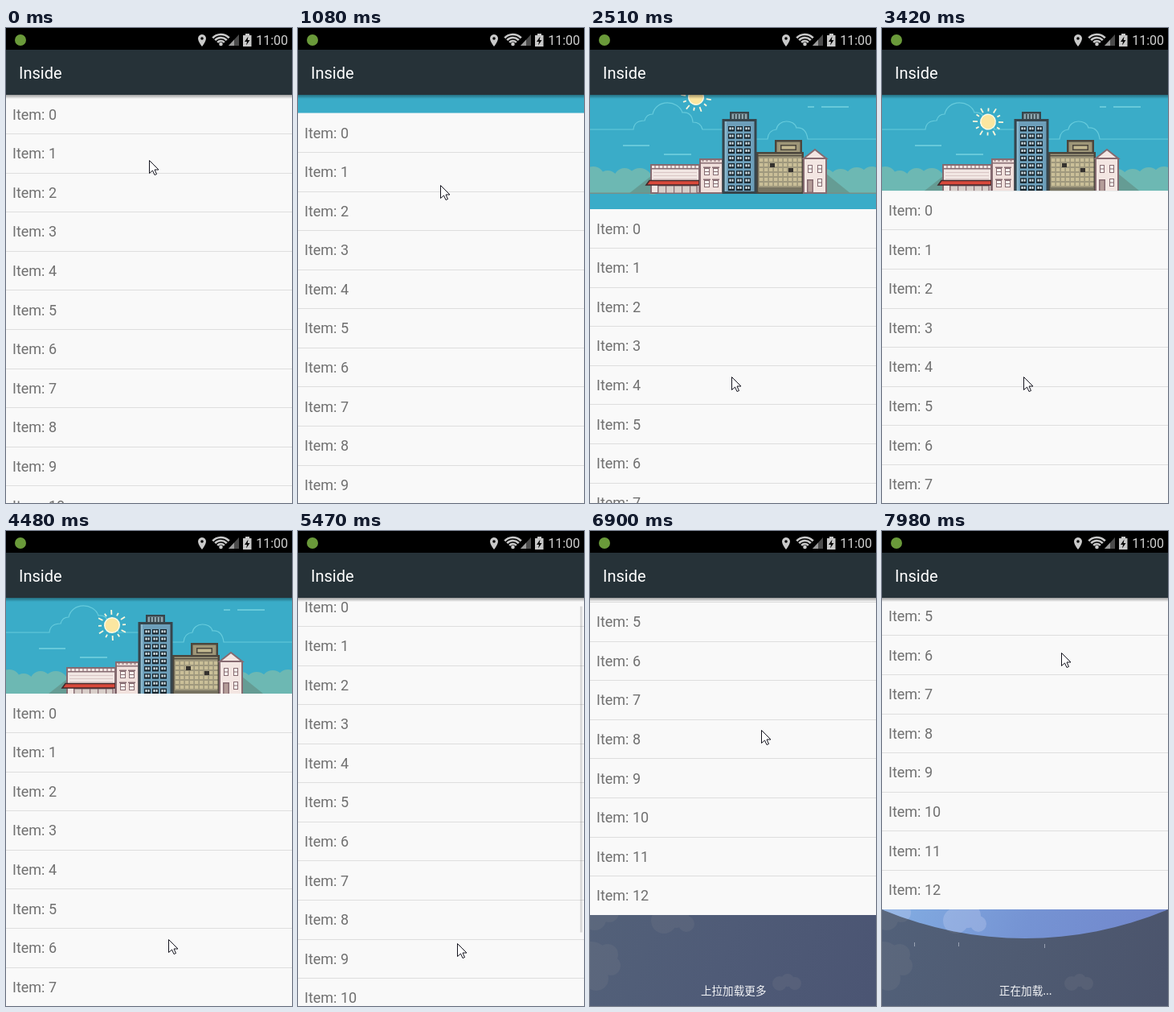
These frames come from a looping animation (356 by 590 pixels, 8 s). An HTML page with a canvas:

```html
<!DOCTYPE html>
<html lang="en">
<head>
<meta charset="utf-8">
<title>Pull to refresh list</title>
<style>
html, body { margin: 0; width: 100%; height: 100%; overflow: hidden; background: #000; }
canvas { display: block; width: 356px; height: 590px; }
</style>
</head>
<body>
<canvas id="stage"></canvas>
<script>
const W = 356, H = 590, TOP = 83, ROW = 48.58, ROWS = 13, HOLD = 119, LOOP = 8000;
const TAU = Math.PI * 2;
const canvas = document.getElementById('stage');
const c = canvas.getContext('2d');
const dpr = window.devicePixelRatio || 1;
canvas.width = W * dpr;
canvas.height = H * dpr;

// Keys are [time, value, ...]; linear in between.
const pointer = [
  [0, 178, 164], [90, 178, 164], [440, 178, 146], [820, 178, 146], [1000, 177, 175],
  [1620, 176, 324], [2100, 176, 402], [2510, 176, 433], [3510, 176, 433],
  [4390, 202, 507], [4480, 202, 507], [5290, 198, 524], [5380, 198, 524],
  [6270, 196, 406], [6900, 213, 247], [7080, 217, 220], [7400, 221, 180], [7710, 223, 151]
];
const scroll = [
  [5380, 0], [6270, 134.5], [6900, 237.5], [7080, 250], [7400, 272],
  [7710, 286], [7800, 286], [7890, 265], [7970, 244.5]
];

function track(keys, t) {
  if (t <= keys[0][0]) return keys[0].slice(1);
  for (let i = 1; i < keys.length; i++) {
    const a = keys[i - 1], b = keys[i];
    if (t < b[0]) {
      const p = (t - a[0]) / (b[0] - a[0]);
      return a.slice(1).map((v, j) => v + (b[j + 1] - v) * p);
    }
  }
  return keys[keys.length - 1].slice(1);
}
const clamp = v => Math.max(0, Math.min(1, v));

// Distance the list is pulled below the toolbar.
function pullAt(t) {
  if (t < 2740) return t < 820 ? 0 : Math.max(0, (track(pointer, t)[1] - 149) / 2);
  if (t < 4490) return HOLD + 23 * (1 - clamp((t - 2740) / 760)) ** 2;
  return HOLD * (1 - clamp((t - 4490) / 700)) ** 3;
}

function rect(x, y, w, h, fill) {
  c.fillStyle = fill;
  c.fillRect(x, y, w, h);
}
function box(x, y, w, h, fill, line, lw = 2) {
  rect(x, y, w, h, line);
  rect(x + lw, y + lw, w - 2 * lw, h - 2 * lw, fill);
}
function poly(pts, fill, line, lw = 1) {
  c.beginPath();
  pts.forEach(([x, y]) => c.lineTo(x, y));
  c.closePath();
  if (fill) { c.fillStyle = fill; c.fill(); }
  if (line) { c.strokeStyle = line; c.lineWidth = lw; c.stroke(); }
}
function dot(x, y, r, fill) {
  c.beginPath();
  c.arc(x, y, r, 0, TAU);
  c.fillStyle = fill;
  c.fill();
}
function text(s, x, y, size, fill, align = 'left', font = 'Roboto, sans-serif') {
  c.font = size + 'px ' + font;
  c.textAlign = align;
  c.fillStyle = fill;
  c.fillText(s, x, y);
}
function clipped(path, draw) {
  c.save();
  c.beginPath();
  path();
  c.clip();
  draw();
  c.restore();
}
function shifted(dy, draw) {
  c.save();
  c.translate(0, dy);
  draw();
  c.restore();
}

function sky() {
  c.strokeStyle = '#66cbdc';
  c.lineWidth = 1.2;
  c.beginPath();
  c.moveTo(0, 126);
  c.lineTo(54, 126);
  c.quadraticCurveTo(55, 115, 68, 115);
  c.quadraticCurveTo(70, 107, 78, 107);
  c.bezierCurveTo(82, 88, 110, 89, 115, 105);
  c.quadraticCurveTo(127, 104, 128, 117);
  c.quadraticCurveTo(138, 117, 140, 126);
  c.lineTo(166, 126);
  c.moveTo(200, 138);
  c.lineTo(221, 138);
  c.quadraticCurveTo(222, 127, 232, 126);
  c.bezierCurveTo(234, 113, 254, 113, 257, 124);
  c.quadraticCurveTo(269, 123, 271, 138);
  c.lineTo(356, 138);
  c.stroke();
  [[271, 98, 8], [288, 98, 34], [41, 146, 33], [92, 157, 34]]
    .forEach(([x, y, w]) => rect(x, y - .8, w, 1.6, '#73d0df'));
}

function sun(y, turn) {
  c.save();
  c.translate(132, y);
  c.rotate(turn);
  c.strokeStyle = '#fff7dc';
  c.lineWidth = 1.8;
  for (let i = 0; i < 12; i++) {
    c.rotate(TAU / 12);
    c.beginPath();
    c.moveTo(0, 13);
    c.lineTo(0, i % 2 ? 17 : 19);
    c.stroke();
  }
  dot(0, 0, 10, '#fffbe8');
  dot(0, 0, 8.6, '#fbe6a0');
  c.restore();
}

function sash(x, y, w, h, frame) {
  box(x, y, w, h, '#f8f4f0', frame, 1);
  rect(x, y + h / 2 - .5, w, 1, frame);
}

function town() {
  const plum = '#866b71', ink = '#36454c', brown = '#4b463d';
  // hills
  c.fillStyle = '#6db8b3';
  c.beginPath();
  [[4, 186, 14], [22, 190, 13], [43, 187, 13], [62, 190, 16], [78, 194, 13],
   [292, 190, 15], [312, 189, 14], [332, 187, 14], [351, 186, 14]].forEach(([x, y, r]) => {
    c.moveTo(x + r, y);
    c.arc(x, y, r, 0, TAU);
  });
  c.rect(0, 189, W, 16);
  c.fill();
  poly([[48, 206], [76, 184], [76, 206]], '#659c94');
  poly([[294, 181], [325, 206], [294, 206]], '#659c94');
  rect(0, 204.5, W, 1.5, '#74908a');

  // shop
  box(75, 169, 62, 37, '#f2e7e4', plum);
  rect(77, 174, 58, 1.5, plum);
  for (let x = 80; x < 134; x += 5) rect(x, 171, 2, 3, '#b7a0a2');
  for (let y = 179; y < 188; y += 4) rect(79, y, 54, 1, '#d9c6c5');
  box(84, 195, 50, 11, '#d9cfca', plum, 1.5);
  for (let x = 94; x < 132; x += 10) rect(x, 196, 1.2, 9, plum);
  poly([[74, 189.5], [136, 189.5], [136, 195], [70, 195]], '#d8493b', '#42292b', 1.6);

  // narrow house
  box(136, 162, 30, 44, '#f1e1dd', plum);
  rect(136, 167, 30, 1.5, plum);
  for (let x = 139; x < 164; x += 5) rect(x, 164, 3, 2, '#b79fa0');
  for (const y of [174, 189]) for (const x of [142, 153]) {
    rect(x - 1, y - 1.5, 9, 1.5, plum);
    sash(x, y, 7, 9, plum);
  }

  // block with a grid of windows
  box(230, 139, 34, 18, '#9e9678', brown, 2.5);
  box(237, 145, 20, 7, '#c2b78f', brown, 1.5);
  box(207, 154, 59, 52, '#9f987d', brown, 2.5);
  rect(209, 158, 55, 1.3, brown);
  for (let j = 0; j < 6; j++) for (let i = 0; i < 9; i++)
    rect(211 + i * 6, 162 + j * 6, 4.3, 4, '#cabf98');
  rect(224, 168, 6, 5, '#35322e');
  rect(247, 174, 6, 5, '#35322e');
  rect(210, 198, 53, 6, '#777361');

  // gabled house
  poly([[266, 162], [280, 151], [294, 162]], '#f3e6e2', plum, 2);
  box(265, 161, 30, 45, '#f3e6e2', plum);
  for (const x of [271, 283]) sash(x, 170, 6, 10, plum);
  sash(283, 187, 6, 10, plum);
  box(270, 188, 8, 17, '#b59d99', plum, 1.5);

  // tower
  box(174, 104, 24, 12, '#8fa6ae', ink, 2.5);
  for (let x = 179; x < 195; x += 4) rect(x, 107, 1.6, 7, ink);
  box(164.5, 113, 43, 93, '#6d9fba', ink, 3);
  rect(168, 116, 2, 87, '#8db9ce');
  for (let y = 122; y < 199; y += 9.2) for (const x of [172, 182, 192]) {
    rect(x, y, 8, 6.4, '#17242c');
    rect(x + 1.4, y + 1.3, 5.2, 3, '#dceaf0');
    rect(x + 3.6, y, 1, 6, '#17242c');
  }
}

function header(t, off) {
  if (off < .5) return;
  const left = 1 - Math.min(1, off / HOLD);
  const sunY = 117 + (HOLD - off) * (off < HOLD ? 1.75 : 1.35);
  const turn = off / HOLD * TAU + Math.max(0, t - 2740) / 1000 * TAU;
  clipped(() => c.rect(0, TOP, W, off), () => {
    rect(0, TOP, W, off, '#3aacc8');
    shifted(100 * left, sky);
    sun(sunY, turn);
    shifted(126 * left, town);
  });
}

function clouds(fill) {
  c.fillStyle = fill;
  c.beginPath();
  [[2, 532, 22], [22, 526, 13], [26, 540, 12], [8, 556, 15], [6, 482, 14], [24, 474, 12],
   [92, 484, 16], [108, 478, 15], [120, 488, 10], [236, 562, 9], [246, 558, 8],
   [255, 562, 8]].forEach(([x, y, r]) => {
    c.moveTo(x + r, y);
    c.arc(x, y, r, 0, TAU);
  });
  c.fill();
}
function wash(stops) {
  const g = c.createLinearGradient(0, 430, W, 560);
  stops.forEach((s, i) => g.addColorStop(i / (stops.length - 1), s));
  rect(0, 400, W, 190, g);
}

function footer(t, pulled) {
  const loading = t > 7870;
  wash(loading ? ['#52617a', '#4f5b72', '#4b546c'] : ['#536179', '#4f5b77', '#4b5573']);
  clouds('rgba(126,130,140,.2)');
  if (loading) {
    const edge = 480 + 26 * clamp((t - 7890) / 80);
    clipped(() => c.arc(178, edge - 458, 458, 0, TAU), () => {
      wash(['#84b0e4', '#7593d3', '#7185cb']);
      clouds('rgba(190,200,235,.35)');
    });
    const fall = Math.min(0, (t - 7970) * .08);
    [[40, 511], [95, 511], [202, 513]].forEach(([x, y]) =>
      rect(x, y + fall, 1, 5, 'rgba(225,230,240,.5)'));
  }
  const label = loading ? '正在加载...' : pulled >= 120 ? '松开加载更多' : '上拉加载更多';
  text(label, 178.7, 576, 13.6, '#f4f5f7', 'center', '"Noto Sans CJK SC", "Noto Sans CJK", sans-serif');
}

function list(t, y) {
  const top = TOP + y, end = top + ROW * ROWS;
  rect(0, top, W, Math.floor(end) - top, '#f9f9f9');
  for (let i = 0; i < ROWS; i++) {
    const at = top + i * ROW;
    if (at > H || at + ROW < TOP) continue;
    text('Item: ' + i, 8, Math.round(at + 30.7), 18, '#707070');
    if (i < ROWS - 1) rect(0, Math.floor(at + ROW), W, 1, '#dedede');
  }
  if (t > 5440 && t < 6440) {
    const off = Math.min(-y, 124);
    const bar = TOP + off * .803 - Math.max(0, -y - 124);
    rect(351, bar, 3, 405, 'rgba(0,0,0,' + .12 * clamp((6440 - t) / 400) + ')');
  }
}

function bars() {
  rect(0, 0, W, 27, '#000');
  rect(0, 27, W, 56, '#263238');
  const g = c.createLinearGradient(0, TOP, 0, TOP + 5);
  g.addColorStop(0, 'rgba(0,0,0,.36)');
  g.addColorStop(1, 'rgba(0,0,0,0)');
  rect(0, TOP, W, 5, g);
  text('Inside', 16, 63, 20, '#fff');
  dot(18, 15, 7, '#6a9a3a');

  const grey = '#c9c9c9';
  // place pin
  c.fillStyle = grey;
  c.beginPath();
  c.arc(244, 13, 5, Math.PI * .9, Math.PI * .1);
  c.quadraticCurveTo(248, 18, 244, 23);
  c.quadraticCurveTo(240, 18, 239.2, 14.5);
  c.fill();
  dot(244, 13, 1.8, '#000');
  // wireless fan
  for (const r of [14, 10, 6]) {
    c.beginPath();
    c.arc(267.5, 22, r, -Math.PI * .76, -Math.PI * .24);
    c.strokeStyle = grey;
    c.lineWidth = 2.6;
    c.stroke();
  }
  dot(267.5, 20, 2.3, grey);
  // signal
  poly([[277, 22], [290, 8], [290, 22]], '#4b4b4b');
  poly([[277, 22], [284, 14.5], [284, 22]], '#9b9b9b');
  // battery
  rect(298, 7, 5, 2, grey);
  rect(295, 9, 10.5, 14, grey);
  poly([[301.5, 10.5], [297, 17], [300, 17], [299, 21.5], [303.5, 15], [300.7, 15]], '#000');
  text('11:00', 351, 21, 16, '#cfcfcf', 'right');
}

function cursor(x, y) {
  c.save();
  c.translate(Math.round(x) + .5, Math.round(y) + .5);
  poly([[0, 0], [0, 16], [4, 12.5], [6.5, 18], [9, 17], [6.5, 11.5], [11.5, 11.5]],
    '#fff', '#15151f', 1);
  c.restore();
}

function draw(now) {
  // The picture advances in even ticks, like a screen recording.
  const raw = now % LOOP;
  const t = Math.max(0, 903 + Math.floor((raw - 896) / 89.49) * 89.49);
  const off = pullAt(t), up = track(scroll, t)[0];
  c.setTransform(dpr, 0, 0, dpr, 0, 0);
  rect(0, 0, W, H, '#f9f9f9');
  footer(t, up - (ROW * ROWS - (H - TOP)));
  header(t, off);
  list(t, off - up);
  bars();
  cursor(...track(pointer, t));
}

let start = null;
function loop(now) {
  if (start === null) start = now;
  draw(now - start);
  requestAnimationFrame(loop);
}
draw(0);
requestAnimationFrame(loop);
</script>
</body>
</html>
```
